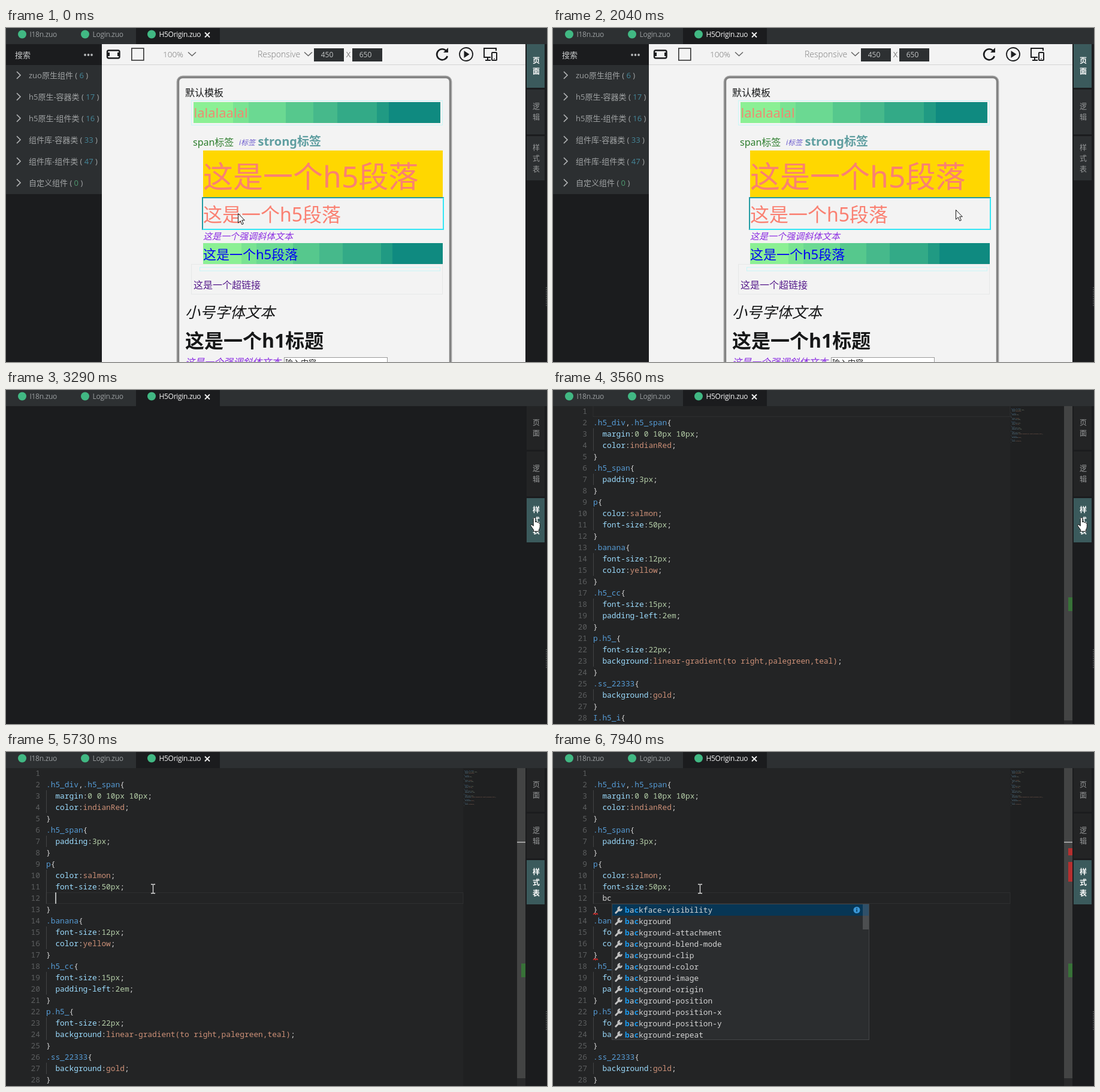
An HTML page that plays this animation: 903x559 px, repeating every 8 s.

```html
<!DOCTYPE html>
<html lang="zh-CN">
<meta charset="utf-8">
<title>Page editor</title>
<style>
  html, body { margin: 0; width: 100%; height: 100%; overflow: hidden; background: #1b1c1e; }
  svg { display: block; width: 903px; height: 559px; }
  text { white-space: pre; font-family: 'Noto Sans', 'Noto Sans CJK SC', 'Noto Sans CJK', sans-serif; }
  .ui { font-family: 'Open Sans', 'Noto Sans CJK SC', 'Noto Sans CJK', sans-serif; }
  .code { font-family: 'Noto Sans Mono', monospace; font-size: 12.83px; }
  .i { font-style: italic; }
  .b { font-weight: 700; }
</style>
<svg id="stage" viewBox="0 0 903 559"></svg>
<script>
const LOOP = 8000;
const DARK = '#1b1c1e', PANEL = '#2c2f31', LIGHT = '#f3f3f3', ACCENT = '#3b5a5c';

const rect = (x, y, w, h, fill, extra = '') =>
  `<rect x="${x}" y="${y}" width="${w}" height="${h}" fill="${fill}" ${extra}/>`;
const frame = (x, y, w, h, color, width = 1, extra = '') =>
  rect(x, y, w, h, 'none', `stroke="${color}" stroke-width="${width}" ${extra}`);
const circle = (x, y, r, fill, extra = '') => `<circle cx="${x}" cy="${y}" r="${r}" fill="${fill}" ${extra}/>`;
const stroke = (d, color, width = 1, extra = '') =>
  `<path d="${d}" fill="none" stroke="${color}" stroke-width="${width}" ${extra}/>`;
const shape = (d, fill) => `<path d="${d}" fill="${fill}"/>`;
const text = (x, y, s, size, fill, cls = '', extra = '') =>
  `<text x="${x}" y="${y}" font-size="${size}" fill="${fill}" class="${cls}" ${extra}>${s}</text>`;
const span = (s, fill) => `<tspan fill="${fill}">${s}</tspan>`;
const centered = 'text-anchor="middle"';

// ---------- window chrome ----------
function topTabs() {
  const tab = (x, y, name, color) => circle(x, y, 7, '#41b883') +
    text(x + 12.5, 15, name, 12, color, 'ui', 'letter-spacing="-.3"');
  return rect(0, 0, 903, 27, '#2d3032') + rect(217, 0, 140, 27, DARK) +
    tab(27, 10.5, 'I18n.zuo', '#9a9ea0') + tab(132, 10.5, 'Login.zuo', '#9a9ea0') +
    tab(243, 10.5, 'H5Origin.zuo', '#f4f4f4') + stroke('M332 7.5l8 8m0-8l-8 8', '#f4f4f4', 1.8);
}

function sideTabs(active, idle) {
  const tabs = [['页面', 27, 73, 59], ['逻辑', 103, 75, 136], ['样式表', 181, 74, 205]];
  let out = rect(867, 27, 36, 532, DARK);
  tabs.forEach(([label, y, h, base], n) => {
    const on = n === active;
    out += rect(869, y, 30, h, on ? ACCENT : idle);
    [...label].forEach((ch, k) =>
      out += text(885, base + 18 * k, ch, 12, on ? '#fff' : '#97999a', on ? 'b' : '', centered));
  });
  return out + stroke('M902 434v31', '#77797a', 1.5, 'stroke-dasharray="1 2"');
}

// ---------- page preview ----------
function sidebar() {
  const groups = [['zuo原生组件', 6], ['h5原生-容器类', 17], ['h5原生-组件类', 16],
    ['组件库-容器类', 33], ['组件库-组件类', 47], ['自定义组件', 0]];
  let out = text(15, 50, '搜索', 13, '#c8cacb') + rect(0, 62, 160, 216, PANEL);
  for (const x of [132, 137.5, 143]) out += circle(x, 45, 1.9, '#b5b7b8');
  groups.forEach(([name, count], n) => {
    const y = 79 + 36 * n;
    out += stroke(`M18 ${y - 6}l6 6-6 6`, '#b5b7b8', 1.6) +
      text(38, y + 5, `${name} ( ${span(count, count ? '#45879a' : '#4f9a70')} )`, 13, '#a0a3a4', 'ui');
  });
  return out;
}

function toolbar() {
  const ink = '#1c1d1f', grey = '#777';
  const size = (x, n) => rect(x, 34, 50, 22, '#2d3032') + text(x + 22, 49, n, 12, '#c4c6c7', 'ui', centered);
  const chevron = x => stroke(`M${x} 40.5l6.5 6 6.5-6`, '#666', 1.6);
  return rect(160, 27, 707, 35, LIGHT) + rect(160, 61, 707, 1, '#d4d4d4') +
    frame(169, 37.5, 20.5, 13, ink, 2.4, 'rx="2.5"') + rect(169, 41, 4, 6, ink) + rect(186, 41, 4, 6, ink) +
    frame(209.8, 34, 20, 20, '#333', 1.6) +
    text(262, 49, '100%', 13.5, grey, 'ui', 'font-weight="300"') + chevron(304) +
    text(420, 49, 'Responsive', 14, grey, 'ui', 'font-weight="300"') + chevron(498) +
    size(514, 450) + text(571.5, 49, 'X', 13, grey, 'ui', centered) + size(578, 650) +
    stroke('M735 38.5A9 9 0 1 0 736.7 47', ink, 2.6) + shape('M738 33v8h-8z', ink) +
    circle(768, 44, 11, 'none', `stroke="${ink}" stroke-width="1.8"`) + shape('M764.5 38l9 6-9 6z', ink) +
    stroke('M809 49H798V34h20v4M804 49v4m-4 1h9', ink, 2) + frame(811, 41, 8, 13, ink, 2, 'rx="1"') +
    rect(814, 51, 2, 1, ink);
}

function bandedBar(x, y, w) {
  const edges = [0, .16, .223, .374, .485, .583, .743, .791, 1];
  const colors = ['#8bf094', '#79e392', '#6bd992', '#56c88d', '#46b98b', '#33aa87', '#209a83', '#0f8a80'];
  return colors.map((c, n) => {
    const left = Math.round(x + w * edges[n]);
    return rect(left, y, Math.round(x + w * edges[n + 1]) - left, 35, c);
  }).join('');
}

function preview() {
  const ink = '#161718', salmon = '#fa8072', violet = '#8a2be2', aqua = '#c9f6f7';
  const para = '这是一个h5段落', slanted = '这是一个强调斜体文本';
  return rect(160, 27, 707, 532, LIGHT) + toolbar() +
    frame(286, 81, 457, 520, '#b4b4b4', 3, 'rx="9"') + frame(287.5, 82.5, 454, 520, '#828282', 3.5, 'rx="7"') +
    text(299, 114, '默认模板', 16, ink) +
    frame(309.5, 121.5, 419, 41, aqua) + bandedBar(313, 124, 412) + text(313.5, 150, 'lalalaalal', 22, '#ee8a72') +
    text(312, 197, 'span标签', 16, '#2c7d2c') + text(389, 196, 'i标签', 12, '#6a5acd', 'i') +
    text(420.5, 197, 'strong标签', 20, '#5f9ea0', 'b') +
    rect(329, 205, 400, 78, '#ffd700') + text(329, 267, para, 50, salmon) +
    stroke('M328 338V284h403', '#239ba3', 2) + stroke('M328 337h402V284', '#33e6f5', 2) +
    text(329, 324, para, 32, salmon) + text(329, 354, slanted, 15, violet, 'i') +
    bandedBar(329, 360, 400) + text(329, 387, para, 22, '#0000f5') +
    frame(309.5, 395.5, 419, 50, '#e6e8e8') + frame(323.5, 400.5, 401, 6, aqua) +
    text(313, 436, '这是一个超链接', 16, '#551a8b') + text(299, 485, '小号字体文本', 25, ink, 'i') +
    text(299, 535, '这是一个h1标题', 32, ink, 'b') + text(299, 565, slanted, 16, violet, 'i') +
    rect(464.5, 551.5, 172, 20, '#fff', 'stroke="#9a9a9a"') + text(466, 565, '输入内容', 13, '#222');
}

// ---------- style editor ----------
const CHAR = 7.698, LINE = 19;
const SOURCE = `
.h5_div,.h5_span{
  margin:0 0 10px 10px;
  color:indianRed;
}
.h5_span{
  padding:3px;
}
p{
  color:salmon;
  font-size:50px;
}
.banana{
  font-size:12px;
  color:yellow;
}
.h5_cc{
  font-size:15px;
  padding-left:2em;
}
p.h5_{
  font-size:22px;
  background:linear-gradient(to right,palegreen,teal);
}
.ss_22333{
  background:gold;
}
I.h5_i{
  color:slateblue;
}`.split('\n');

const PLAIN = '#d4d4d4';
function highlight(line) {
  const rule = line.match(/^(\s+)([\w-]+):(.*);$/);
  if (rule) {
    const [, indent, name, value] = rule;
    return indent + span(name, '#9cdcfe') + ':' + span(value, /^\d/.test(value) ? '#b5cea8' : '#ce9178') + ';';
  }
  if (!line.endsWith('{')) return line;
  return line.slice(0, -1).split(',').map(s => span(s, '#569cd6')).join(',') + '{';
}
const lineTop = n => 26 + LINE * (n - 1);
const codeText = (x, y, s, fill = PLAIN, extra = '') => `<text class="code" x="${x}" y="${y}" fill="${fill}" ${extra}>${s}</text>`;

function minimap(lines) {
  const body = lines.map((s, n) => codeText(0, 12 + n * 15.4, highlight(s))).join('');
  return `<g transform="translate(764 28) scale(.13)" opacity=".8">${body}</g>`;
}

function ruler(t, inserted, cursorLine) {
  let out = rect(853, 27, 14, 532, '#292a2b') + rect(853, 27, 14, inserted ? 519 : 526, '#434444') +
    rect(860, inserted ? 354 : 347, 7, 23, '#387238');
  if (cursorLine > 1) out += rect(853, cursorLine === 12 ? 150 : 140, 14, 2, '#a0a0a0');
  if (t >= 7390) out += rect(860, 161, 7, 12, '#b52f2f') + rect(860, 184, 7, 33, '#b52f2f');
  return out;
}

function wrench(x, y) {
  return `<g transform="translate(${x} ${y})">` + stroke('M1.8 11.2L8 5', '#c5c5c5', 3, 'stroke-linecap="round"') +
    stroke('M9 1.6A3 3 0 1 0 11.6 4.4', '#c5c5c5', 2.4) + '</g>';
}

function suggestions(x, typed) {
  const suffixes = ['', ...['attachment', 'blend-mode', 'clip', 'color', 'image', 'origin',
    'position', 'position-x', 'position-y', 'repeat'].map(s => '-' + s)];
  const names = ['backface-visibility', ...suffixes.map(s => 'background' + s)];
  const mark = s => `<tspan fill="#1a9bf0" font-weight="700">${s}</tspan>`;
  let out = rect(x + .5, 254.5, 429, 227, '#2b2d2f', 'stroke="#434547"') + rect(x + 1, 255, 428, 19, '#073655') +
    rect(x + 419, 255, 10, 42, '#4c4e50') + rect(x + 419, 255, 10, 19, '#2f5069');
  names.forEach((name, n) => {
    const y = 255 + LINE * n;
    const label = mark('b') + 'a' + (typed.length > 1 ? mark('c') : 'c') + name.slice(3);
    out += wrench(x + 5, y + 3) + codeText(x + 22, y + 14, label);
  });
  return out + circle(x + 409, 264.5, 5.5, '#3a96d6') + rect(x + 408.3, 263.5, 1.5, 4, '#073655') +
    rect(x + 408.3, 261, 1.5, 1.5, '#073655');
}

function editor(t) {
  const inserted = t >= 5730;
  const typed = t >= 7270 ? 'bc' : t >= 6730 ? 'b' : '';
  const cursorLine = inserted ? 12 : t >= 4780 ? 11 : 1;
  const lines = [...SOURCE];
  if (inserted) lines.splice(11, 0, '  ' + typed);

  let out = rect(0, 27, 853, 532, '#232425') + rect(763, 27, 90, 532, '#1f2021');
  const top = lineTop(cursorLine);
  out += frame(67, top + .5, 696, LINE - 1, '#2e2f30');
  lines.slice(0, 28).forEach((line, n) => {
    const y = lineTop(n + 1);
    out += codeText(57, y + 14, n + 1, '#5c5e5f', 'text-anchor="end"');
    if (line.startsWith(' ')) out += rect(67, y, 1, LINE, '#424344');
    out += codeText(67, y + 14, highlight(line));
  });
  out += rect(0, 26, 853, 1, '#232425');

  if (t >= 3560) out += minimap(lines) + ruler(t, inserted, cursorLine);
  if (t >= 7390)
    for (const n of [13, 17]) out += stroke(`M67 ${lineTop(n) + 18}l2-2 2 2 2-2 2 2`, '#e02a2a', 1.3);

  const caretOn = [[4780, 5180], [5730, 6140], [6730, 7940]].some(([a, b]) => t >= a && t < b);
  const column = inserted ? 2 + typed.length : lines[10].length;
  if (caretOn) out += rect(Math.round(67 + CHAR * column), top, 2, LINE, '#b4b6b6');
  if (t >= 6880) out += suggestions(Math.round(67 + CHAR * column), typed);
  return out;
}

// ---------- pointer ----------
const pointers = {
  arrow: '<path d="M.5 .5v15.8l3.7-3.5 2.6 6 2.5-1.1-2.6-5.9h4.6z" fill="#fff" stroke="#111"/>',
  hand: '<path d="M-1.7 1.5Q0-.8 1.7 1.5V8Q3.5 6.800 4.600 8.600 6.500 7.800 7.200 9.600 9.300 9.200 9.300 11.500V16Q9 19 7.500 20.500V23.500H-1.500V21L-6 14.500Q-7 12-5 12L-1.700 14.500Z" fill="#fff" stroke="#111"/>',
  beam: stroke('M-3.5-7.500H-1L0-6.800 1-7.500H3.500M0-7V7M-3.500 7.500H-1L0 6.800 1 7.500H3.500', '#e0e0e0', 1.3)
};
const track = [
  [0, 387, 310], [150, 470, 312], [270, 553, 318], [410, 590, 325], [530, 606, 328], [680, 583, 316],
  [830, 530, 310], [950, 483, 306], [1100, 415, 306], [1250, 450, 309], [1380, 486, 313], [1530, 520, 313],
  [1650, 553, 313], [1800, 590, 312], [1920, 632, 309], [2040, 672, 304], [2160, 701, 298], [2310, 770, 264],
  [2430, 833, 231], [2580, 862, 212], [2710, 883, 198], [2860, 885, 197], [3010, 882, 213],
  [3680, 560, 218], [3800, 282.5, 219], [3940, 268, 220], [4070, 255.5, 221], [4220, 245.5, 229]
];
function pointer(t) {
  const [since, x, y] = track.findLast(([start]) => t >= start);
  const kind = since < 2860 ? 'arrow' : since < 3680 ? 'hand' : 'beam';
  return `<g transform="translate(${x} ${y})">${pointers[kind]}</g>`;
}

// ---------- playback ----------
function scene(t) {
  const showsPage = t < 3290;
  const content = showsPage ? sidebar() + preview() : t >= 3410 ? editor(t) : '';
  return rect(0, 0, 903, 559, DARK) + content + topTabs() +
    sideTabs(showsPage ? 0 : 2, showsPage ? PANEL : '#232425') + pointer(t);
}

const stage = document.getElementById('stage');
const start = performance.now();
let shown = '';
function tick() {
  const markup = scene((performance.now() - start) % LOOP);
  if (markup !== shown) stage.innerHTML = shown = markup;
  requestAnimationFrame(tick);
}
tick();
</script>
</html>
```
